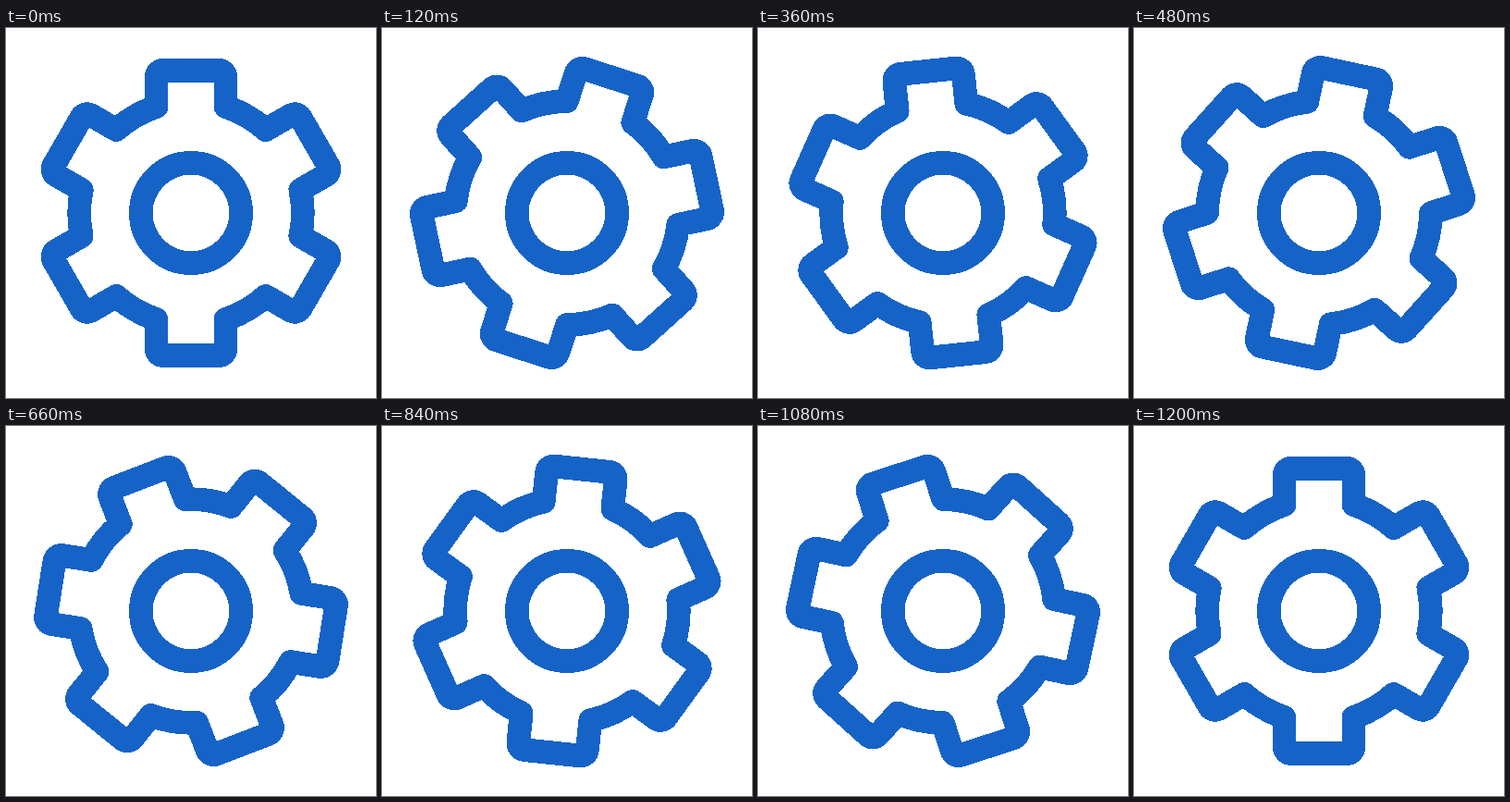
These frames come from a looping animation (400x400 px, 1.23 s). An HTML page without scripts:

```html
<!DOCTYPE html>
<html lang="en">
<head>
<meta charset="utf-8">
<title>Turning gear</title>
<style>
  @property --turn {
    syntax: "<angle>";
    inherits: true;
    initial-value: 0deg;
  }

  html, body {
    margin: 0;
    width: 100%;
    height: 100%;
    overflow: hidden;
    background: #fff;
  }

  svg {
    display: block;
    width: 100%;
    height: 100%;
    fill: none;
    stroke: #1663c7;
    stroke-width: 1.54;
    stroke-linecap: round;
    stroke-linejoin: round;
    shape-rendering: crispEdges;
    /* 41 poses from 0 to 180 degrees, both ends included */
    animation: turn 1230ms steps(41, jump-none) infinite;
  }

  /* Rotating inside the drawing keeps the edges hard */
  .gear {
    transform: rotate(var(--turn));
    transform-origin: 0 0;
  }

  @keyframes turn {
    from { --turn: 0deg; }
    to { --turn: 180deg; }
  }
</style>
</head>
<body>
<svg viewBox="-12 -12 24 24">
  <defs>
    <!-- One tooth and the rim up to the next tooth -->
    <path id="tooth" d="M-2.25-6.892V-8.8a.45.45 0 0 1 .45-.45H1.8a.45.45 0 0 1 .45.45V-6.892A7.25 7.25 0 0 1 4.844-5.395"/>
  </defs>
  <circle r="3.25"/>
  <g class="gear">
    <use href="#tooth"/>
    <use href="#tooth" transform="rotate(60)"/>
    <use href="#tooth" transform="rotate(120)"/>
    <use href="#tooth" transform="rotate(180)"/>
    <use href="#tooth" transform="rotate(240)"/>
    <use href="#tooth" transform="rotate(300)"/>
  </g>
</svg>
</body>
</html>
```
